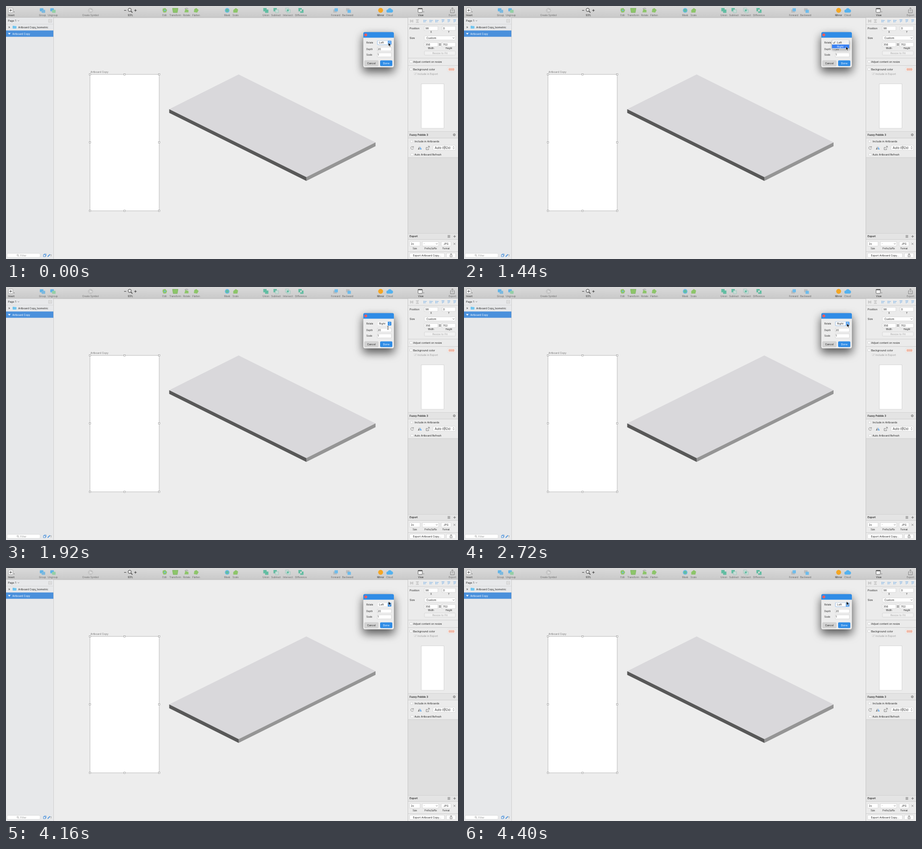
Recreate the animation shown at these times as an HTML page. Size 888 px wide and 499 px high, loop 4560 ms.

```html
<!DOCTYPE html>
<html lang="en">
<head>
<meta charset="utf-8">
<title>Rotate panel</title>
<style>
html, body { margin: 0; width: 100%; height: 100%; overflow: hidden; background: #ededed; }
svg { display: block; width: 888px; height: 499px; }
text { font-family: Inter, Roboto, "Liberation Sans", sans-serif; white-space: pre; }
.panel { filter: drop-shadow(0 8px 9px rgba(0,0,0,.5)) drop-shadow(0 0 .6px rgba(0,0,0,.5)); }
.menu { filter: drop-shadow(0 2px 2px rgba(0,0,0,.3)) drop-shadow(0 0 .5px rgba(0,0,0,.5)); }
</style>
</head>
<body>
<svg id="stage" viewBox="0 0 888 499" xmlns="http://www.w3.org/2000/svg"></svg>
<script>
const LOOP = 4560, STEP = 80;
const BLUE = '#2f8ce6', INK = '#222', GREY = '#777', LINE = '#c6c6c6';

// Markup helpers
const rect = (x, y, w, h, fill, more = '') =>
  `<rect x="${x}" y="${y}" width="${w}" height="${h}" fill="${fill}" ${more}/>`;
const text = (x, y, s, size = 5.1, fill = INK, more = '') =>
  `<text x="${x}" y="${y}" font-size="${size}" fill="${fill}" ${more}>${s}</text>`;
const mid = (x, y, s, size, fill, more = '') => text(x, y, s, size, fill, 'text-anchor="middle" ' + more);
const path = (d, stroke, w = .7, fill = 'none') =>
  `<path d="${d}" stroke="${stroke}" stroke-width="${w}" fill="${fill}"/>`;
const shape = (d, fill) => `<path d="${d}" fill="${fill}"/>`;
const dot = (x, y, r, fill, more = '') => `<circle cx="${x}" cy="${y}" r="${r}" fill="${fill}" ${more}/>`;
const poly = (pts, fill) => `<polygon points="${pts}" fill="${fill}"/>`;
const group = (id, body, more = '') => `<g id="${id}" ${more}>${body}</g>`;
const field = (x, y, w, h = 8) => rect(x, y, w, h, '#fff', 'stroke="#c4c4c4" stroke-width=".5"');
const button = (x, y, w, h, fill = '#fff') =>
  rect(x, y, w, h, fill, 'rx="1.6" stroke="#c2c2c2" stroke-width=".5"');
const check = (x, y) => rect(x, y, 4.6, 4.6, '#fff', 'rx=".9" stroke="#b8b8b8" stroke-width=".5"');
const hline = (y, x = 790, w = 98) => rect(x, y, w, .7, LINE);
const updown = (x, y, c) =>
  path(`M${x - 1.3} ${y - .8}l1.3 -1.5l1.3 1.5M${x - 1.3} ${y + .8}l1.3 1.5l1.3 -1.5`, c);

function toolbar() {
  const green = '#8dc56a', pale = '#a9a9a9', sky = '#6dbcec', teal = '#62bda2';
  const labels = [
    [10.5, 'Insert', INK], [71.5, 'Group'], [92, 'Ungroup'], [166, 'Create Symbol'], [244.5, '93%', INK],
    [311.5, 'Edit'], [332.5, 'Transform'], [355, 'Rotate'], [373.5, 'Flatten'], [434.5, 'Mask'],
    [451, 'Scale'], [510.5, 'Union'], [530.5, 'Subtract'], [554, 'Intersect'], [579.5, 'Difference'],
    [647.5, 'Forward'], [671.5, 'Backward'], [736, 'Mirror', INK], [753.5, 'Cloud'],
    [815, 'View', INK], [877, 'Export']
  ];
  const pair = (x, a, b) => rect(x - 5, 4.5, 7, 6, a, 'rx="1"') + rect(x - 1.5, 7.5, 7, 6, b, 'rx="1"');
  return `<defs><linearGradient id="bar" x2="0" y2="1"><stop stop-color="#dadada"/>
    <stop offset="1" stop-color="#c9c9c9"/></linearGradient></defs>`
    + rect(0, 0, 888, 23, 'url(#bar)') + rect(0, 22.6, 888, .7, '#b1b1b1')
    + labels.map(([x, s, c]) => mid(x, 20, s, 4.7, c || '#696969')).join('')
    + rect(5, 4, 8.5, 9, '#f8f8f8', 'rx="1.2" stroke="#888" stroke-width=".6"')
    + path('M9.25 6v5M6.75 8.5h5', '#444', .9) + path('M14.8 11l1.1 1.1l1.1 -1.1', '#555')
    + pair(71.5, '#5fb3e8', '#7cb9df') + pair(92, '#5fb3e8', '#93cfa5')
    + dot(166, 8.7, 4.2, '#dedede', `stroke="${pale}" stroke-width=".8"`)
    + path('M168 7a2.6 2.6 0 1 0 .3 3M168.4 5.8v1.6h-1.6', pale)
    + path('M232 8.7h4.2M252 8.7h4.6M254.3 6.4v4.6', '#333', .9)
    + dot(243, 7.6, 3.2, '#e6e6e6', 'stroke="#444" stroke-width="1"') + path('M245.4 10l3 3', '#444', 1.4)
    + shape('M308 5l5 -1l3.5 4l-2 4.5l-5 .5l-2 -4z', green) + dot(312, 8.6, 1.5, sky)
    + shape('M327 4.5h11l-1.5 8.5h-8z', green)
    + path('M327 4.5h11l-1.5 8.5h-8z', '#6ea94f', .6)
    + shape('M350.5 12.5l2 -7l6 2.5v4.5z', green) + path('M351 6a5 5 0 0 1 7 -.5', GREY)
    + shape('M369 12l1 -6l4 -2l4.5 4l-3 5z', green)
    + dot(434.5, 8.7, 4.6, sky) + rect(431.5, 6, 6, 5.5, teal, 'rx="1"')
    + shape('M446.5 13v-5l5 -4l4.5 3l-1.5 6z', green)
    + rect(505.5, 4, 6.5, 6.5, teal) + rect(509, 7, 6.5, 6.5, teal)
    + rect(525.5, 4, 6.5, 6.5, teal) + rect(529, 7, 6.5, 6.5, '#c5dcd5', 'stroke="#8cb9ae" stroke-width=".5"')
    + rect(549, 4, 6.5, 6.5, '#c5dcd5', 'stroke="#8cb9ae" stroke-width=".5"')
    + rect(552, 7, 6.5, 6.5, '#c5dcd5', 'stroke="#8cb9ae" stroke-width=".5"') + rect(552, 7, 3.5, 3.5, teal)
    + rect(574.5, 4, 6.5, 6.5, teal) + rect(578, 7, 6.5, 6.5, teal) + rect(578, 7, 3, 3.5, '#d5d5d5')
    + rect(643, 7, 7, 6, '#bcbcbc') + rect(645.5, 4.5, 6.5, 6, sky)
    + rect(668, 4.5, 7, 6, '#bcbcbc') + rect(671, 7.5, 6.5, 6, sky)
    + dot(736, 8.6, 4.8, '#f5a623')
    + shape('M750.5 13a3 3 0 0 1 -.3 -6a4 4 0 0 1 7.3 -.5a3.3 3.3 0 0 1 .3 6.5z', '#55b2ee')
    + rect(809.5, 4.5, 8.5, 8.3, '#f3f3f3', 'rx="1" stroke="#555" stroke-width=".8"')
    + rect(809.5, 4.5, 8.5, 1.8, '#555') + path('M819.4 11l1.1 1.1l1.1 -1.1', '#555')
    + path('M874.8 7.5h-1.6v6h7.6v-6h-1.6M877 10.5v-7M874.8 5.5l2.2 -2.2l2.2 2.2', GREY, .8);
}

function sidebar() {
  return rect(0, 23, 93, 476, '#e7e8ea') + rect(93, 23, .7, 476, '#c4c4c4')
    + text(4, 31.2, 'Page 1', 5.1) + path('M23 28.4l1.4 1.4l1.4 -1.4', '#555')
    + rect(84, 26.8, 5.6, 5.2, '#f4f4f4', 'stroke="#999" stroke-width=".5"') + path('M85.5 29.4h2.6', '#777')
    + rect(0, 35.6, 93, .6, '#d0d0d0')
    + shape('M5.4 39.7l2.8 2.2l-2.8 2.2z', '#777')
    + rect(13, 39.5, 7.5, 5, '#70c5ef', 'rx=".8"') + rect(13, 39, 3.4, 1.5, '#70c5ef')
    + text(24, 43.9, 'Artboard Copy_Isometric', 5.02)
    + rect(0, 48.3, 93, 12.4, '#4a90dc') + shape('M4 53.2h5l-2.5 3.2z', '#fff')
    + text(12.4, 56.5, 'Artboard Copy', 5.05, '#fff')
    + rect(2, 488, 65, 7.8, '#fff', 'rx="1.8" stroke="#c8c8c8" stroke-width=".5"')
    + dot(23, 491.4, 1.5, 'none', 'stroke="#888" stroke-width=".6"') + path('M24.1 492.6l1.5 1.5', '#888')
    + text(28, 493.9, 'Filter', 5.2, '#999')
    + path('M73.5 490.5h4v4h-4zM75 490.5v-1.5h3.8v4h-1.3', '#3d8bdc', .8)
    + path('M81.8 494.5l4.6 -4.6', '#3d8bdc', 1.5) + text(87.6, 493.7, '1', 4.7, '#555');
}

function artboard() {
  const handles = [165, 233, 301].flatMap(x => [135, 269, 404].map(y => [x, y]))
    .filter(([x, y]) => x !== 233 || y !== 269);
  return text(166, 131.8, 'Artboard Copy', 5.05, GREY)
    + rect(165, 135, 136, 269, '#fff', 'stroke="#a5a5a5" stroke-width=".7"')
    + handles.map(([x, y]) =>
      rect(x - 1.6, y - 1.6, 3.2, 3.2, '#fff', 'stroke="#8c8c8c" stroke-width=".6"')).join('');
}

function slabs() {
  const top = '#d9d8db', dark = '#585858', side = '#959595';
  return group('slabLeft', poly('457,135 726,269 590,337.6 320.6,203.5', top)
      + poly('320.6,203.5 590,337.6 590,345 320.6,210.7', dark)
      + poly('590,337.6 726,269 726,276.4 590,345', side))
    + group('slabRight', poly('590,135 726,203.5 457,337.6 320.6,269', top)
      + poly('320.6,269 457,337.6 457,345 320.6,276.4', dark)
      + poly('457,337.6 726,203.5 726,210.7 457,345', side));
}

function alignIcons() {
  const icon = (x, i) => path(i % 2
    ? `M${x - 2.5} 27v5.4M${x - 1} 28.4h3.8M${x - 1} 31h2.4`
    : `M${x - 2.8} 27.2h5.6M${x - 1.2} 28.6v3.6M${x + 1.2} 28.6v2.4`, '#69a9e6', .9);
  return path('M794.8 27v5.4M799.2 27v5.4M797 28v3.4M805.5 27.2h5.4M805.5 32.2h5.4M806.5 29.7h3.4', '#9a9a9a', .8)
    + [823.5, 835.5, 847, 858.5, 870, 881.5].map((x, i) => icon(x, i < 3 ? 1 : 0)).join('');
}

function inspector() {
  const bold = 'font-weight="600"';
  return rect(789.5, 23, 98.5, 476, '#ebebeb') + rect(789.5, 299, 98.5, 150, '#dfdfdf')
    + rect(789.2, 23, .7, 476, '#bdbdbd') + alignIcons() + hline(35.8)
    + text(793, 45.8, 'Position') + field(822, 40, 26.5) + text(824, 45.9, '98')
    + field(857, 40, 26) + text(858.8, 45.9, '0')
    + mid(835.3, 52.8, 'X', 4.2) + mid(870, 52.8, 'Y', 4.2)
    + text(793, 64.9, 'Size') + button(822, 59, 61, 8) + text(826, 64.9, 'Custom', 5.3)
    + path('M877.6 62.2l1.7 1.7l1.7 -1.7', '#444', .8)
    + field(822, 72, 26.5) + text(824, 77.9, '356') + field(856.5, 72, 26.5) + text(858.5, 77.9, '702')
    + path('M850.8 75.3v-.8h3.4v.8M850.8 76.6v.8h3.4v-.8M851.5 76h2', '#555')
    + mid(835, 85.3, 'Width', 4.25) + mid(870, 85.3, 'Height', 4.25)
    + button(822, 88.7, 61, 8.2, '#f1f1f1') + mid(852.6, 94.7, 'Resize to Fit', 5.15, '#a5a5a5')
    + hline(102.5) + check(793.4, 107.4) + text(800, 111.6, 'Adjust content on resize', 4.95)
    + hline(116.9) + check(793.4, 122.3) + text(800, 126.5, 'Background color', 5.15)
    + button(867.5, 121, 15.5, 8) + rect(869.2, 122.4, 12, 5.2, '#efbbaa')
    + rect(801.8, 131.4, 4.6, 4.6, '#f3f3f3', 'rx=".9" stroke="#ccc" stroke-width=".5"')
    + path('M802.8 133.7l1 1.2l1.8 -2.5', '#999') + text(808.3, 135.6, 'Include in Export', 5.05, '#9a9a9a')
    + rect(816, 153.5, 44.3, 87.6, '#fff', 'stroke="#c8c8c8" stroke-width=".6"')
    + hline(247.4) + rect(790, 248, 98, 12.2, '#e4e4e4') + text(793, 255.8, 'Fuzzy Pebble 3', 4.95, INK, bold)
    + dot(880.6, 254, 1.8, 'none', 'stroke="#777" stroke-width="1.3" stroke-dasharray="1 .41"')
    + dot(880.6, 254, 1.5, 'none', 'stroke="#777" stroke-width=".6"') + hline(260.3)
    + check(794.5, 264.7) + text(803, 268.9, 'Include in Artboards', 5.05)
    + path('M800.2 278.3a2.8 2.8 0 1 0 .4 2.6M800.6 276.6v2.2h-2.2', '#777')
    + shape('M809.2 283l3 -6v6z', '#777') + shape('M816.6 283l-3 -6v6z', '#5aa0e4')
    + path('M828 279h-2.6v4.4h4.8v-2.4M828 280.8l3.6 -4M829 276.6h2.8v2.8', '#666')
    + button(839, 275, 44, 9.4) + text(842.3, 281.9, 'Auto (@2x)', 5.85) + updown(879.4, 279.7, '#444')
    + check(795.4, 290.7) + text(802.6, 294.9, 'Auto Artboard Refresh', 5) + hline(298.6)
    + hline(448.6) + rect(790, 449.2, 98, 11, '#e4e4e4') + text(793, 456.4, 'Export', 4.95, INK, bold)
    + path('M867.6 452.6h5M867.6 454.5h5M867.6 456.4h5', '#666', .8)
    + path('M881.3 452v5M878.8 454.5h5', '#666', .8) + hline(460.3)
    + field(793, 464.8, 20.3, 8.7) + text(795.5, 471, '2x', 4.9)
    + field(818, 464.8, 32, 8.7) + text(820.5, 470.4, '-', 4.9, GREY) + path('M844.8 468.3l1.5 1.5l1.5 -1.5', '#444')
    + button(855, 464.8, 19.3, 8.7) + mid(864.6, 471, 'JPG', 4.9)
    + path('M879.3 467.3l3.6 3.6M882.9 467.3l-3.6 3.6', '#777')
    + mid(803.3, 480, 'Size', 4.3) + mid(834.4, 480, 'Prefix/Suffix', 4.2) + mid(864.6, 480, 'Format', 4.3)
    + hline(484) + button(793, 487.4, 68.3, 8.6) + mid(827.2, 493.6, 'Export Artboard Copy...', 5)
    + button(865.3, 487.4, 18, 8.6)
    + path('M873.4 490.6h-1v4h4v-4h-1M874.4 492.4v-4M873 489.6l1.4 -1.4l1.4 1.4', '#444', .6);
}

function dialog() {
  return group('dialog',
      shape('M705 51.5h54a3 3 0 0 1 3 3v63.5a3 3 0 0 1 -3 3h-54a3 3 0 0 1 -3 -3v-63.5a3 3 0 0 1 3 -3z', '#ececec'),
      'class="panel"')
    + shape('M705 51.5h54a3 3 0 0 1 3 3v7.9h-60v-7.9a3 3 0 0 1 3 -3z', BLUE) + dot(706.8, 57, 2.8, '#fc5b57')
    + text(708, 74, 'Rotate', 4.45) + text(708, 86.6, 'Depth', 4.3) + text(708, 98.2, 'Scale', 4.4)
    + group('ring', rect(729.2, 67.9, 28.4, 8.8, '#8fbdf0', 'rx="1.8"'))
    + rect(730, 68.6, 27, 7.4, '#fff', 'rx="1.3" stroke="#c4c4c4" stroke-width=".3"')
    + shape('M750 68.6h5.7a1.3 1.3 0 0 1 1.3 1.3v4.8a1.3 1.3 0 0 1 -1.3 1.3h-5.7z" id="knob', BLUE)
    + updown(753.5, 72.3, '#fff') + text(733, 74.2, 'Left', 5.1, INK, 'id="value"')
    + field(729.3, 81.2, 27.7, 7.6) + text(730.2, 86.8, '20', 5.1)
    + field(729.3, 92.6, 27.7, 7.6) + text(730.2, 98.2, '1', 5.1)
    + button(704.4, 107.4, 27, 11, '#d2d2d2') + mid(717.9, 114.8, 'Cancel', 5.1)
    + rect(735, 107.2, 24, 11.4, BLUE, 'rx="1.8"') + mid(747, 114.8, 'Done', 5.1, '#fff');
}

function menu() {
  return group('menu', rect(723, 67, 33.8, 17.8, '#f1f1f1', 'rx="1.6" class="menu"')
    + rect(723, 68.6, 33.8, 7.4, '#3b82f3', 'id="bar-hi"')
    + text(733, 74.2, 'Left', 5.1, INK, 'id="itemLeft"') + text(733, 81.6, 'Right', 5.1, INK, 'id="itemRight"')
    + `<path id="tick" d="M725.6 72.3l1.2 1.7l2.2 -3.7" fill="none" stroke="#fff" stroke-width=".8"/>`);
}

function cursors() {
  return group('arrow', `<path d="M0 0v6.9l1.6 -1.5l1.1 2.6l1.2 -.5l-1.1 -2.5h2.2z" fill="#000"
      stroke="#fff" stroke-width=".5" stroke-linejoin="round"/>`)
    + group('beam', path('M-1.3 -3.2q1.3 0 1.3 .9v4.6q0 .9 -1.3 .9M1.3 -3.2q-1.3 0 -1.3 .9M1.3 3.2q-1.3 0 -1.3 -.9', '#222', .7));
}

document.getElementById('stage').innerHTML = rect(0, 0, 888, 499, '#ededed')
  + slabs() + artboard() + toolbar() + sidebar() + inspector() + dialog() + menu() + cursors();

const el = id => document.getElementById(id);
const show = (id, on) => el(id).setAttribute('visibility', on ? 'visible' : 'hidden');

// Pointer tip: time, x, y
const trail = [
  [0, 751.4, 72.4], [880, 751.4, 72.4], [1040, 751.4, 72.6], [1520, 750.4, 80.6], [2160, 750.4, 80.6],
  [2640, 752.4, 72], [3200, 752.4, 72], [3600, 751.6, 66], [LOOP, 751.6, 66]
];
function pointer(t) {
  const i = Math.max(1, trail.findIndex(p => p[0] > t));
  const [t0, x0, y0] = trail[i - 1], [t1, x1, y1] = trail[i];
  const k = (t - t0) / (t1 - t0), e = k * k * (3 - 2 * k);
  return [x0 + (x1 - x0) * e, y0 + (y1 - y0) * e];
}

function draw(time) {
  const t = Math.floor(time % LOOP / STEP) * STEP;
  const [x, y] = pointer(t);
  const firstMenu = t >= 640 && t < 1760, secondMenu = t >= 2960 && t < 4000;
  const right = t >= 1760 && t < 4000;
  const rotated = t >= 2000 && t < 4240;
  const idle = (t >= 1760 && t < 2000) || (t >= 4000 && t < 4240);
  const open = firstMenu || secondMenu;

  show('slabLeft', !rotated);
  show('slabRight', rotated);
  el('value').textContent = right ? 'Right' : 'Left';
  show('ring', !idle && !open);
  el('knob').setAttribute('fill', idle || open ? BLUE : '#5ba5f2');

  show('menu', open);
  const shift = secondMenu ? -7.4 : 0;
  const onRight = y > 76.2 + shift * .9;
  el('menu').setAttribute('transform', `translate(0 ${shift})`);
  el('bar-hi').setAttribute('y', onRight ? 76 : 68.6);
  el('itemLeft').setAttribute('fill', onRight ? INK : '#fff');
  el('itemRight').setAttribute('fill', onRight ? '#fff' : INK);
  el('tick').setAttribute('transform', `translate(0 ${secondMenu ? 7.4 : 0})`);
  el('tick').setAttribute('stroke', secondMenu === onRight ? '#fff' : INK);

  const beam = !open && y > 77;
  show('arrow', !beam);
  show('beam', beam);
  for (const id of ['arrow', 'beam']) el(id).setAttribute('transform', `translate(${x} ${y})`);
}

const start = performance.now();
(function tick() {
  draw(performance.now() - start);
  requestAnimationFrame(tick);
})();
</script>
</body>
</html>
```
